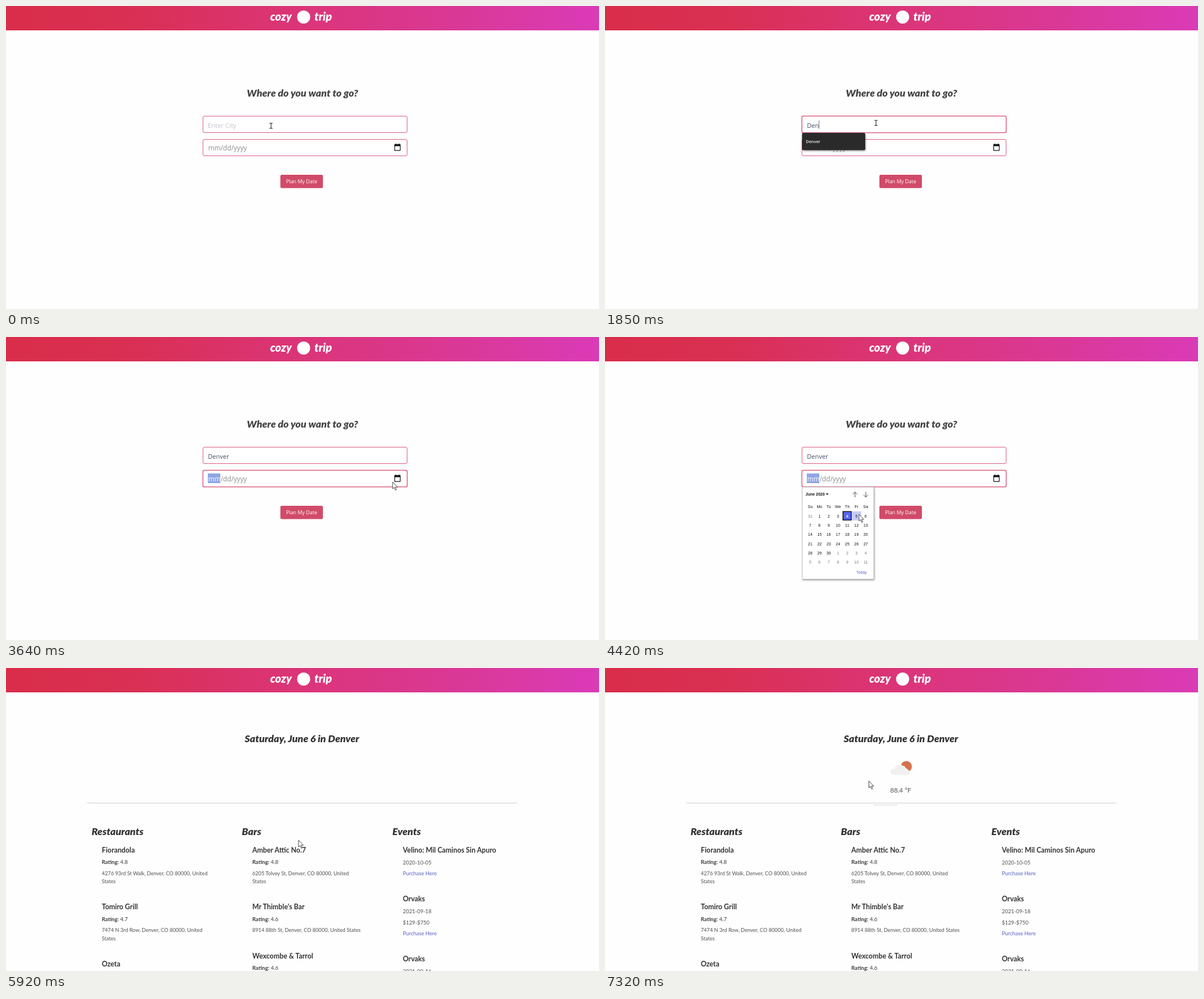
These frames come from a looping animation (1046x535 px, 8000 ms). An HTML page:

```html
<!DOCTYPE html>
<html lang="en">
<head>
<meta charset="utf-8">
<title>Evening planner</title>
<style>
  html, body { margin: 0; width: 100%; height: 100%; overflow: hidden; background: #fefefe; }
  svg { display: block; width: 1046px; height: 535px; }
  text { white-space: pre; }
  .brand, .head { font: italic 900 17.8px Lato, sans-serif; fill: #333; }
  .brand { font-size: 20px; fill: #fff; }
  .ask { fill: #444; }
  .field { fill: #fff; stroke: #dd5c7d; }
  .ring { fill: none; stroke: #e07590; stroke-width: 1.8; }
  .input { font: 11px "Open Sans", sans-serif; fill: #434c66; }
  .hint { font-size: 11.2px; fill: #c0c3cb; }
  .date { font-size: 11.7px; fill: #8b8b8b; }
  .date .on { fill: #fff; }
  .button { font: 8.95px "Open Sans", sans-serif; fill: #fff; }
  .option { font: 600 7.3px "Open Sans", sans-serif; fill: #f2f2f2; }
  .cal { font: 7px "Liberation Sans", Arial, sans-serif; fill: #111; text-anchor: middle; }
  .month { font-weight: bold; text-anchor: start; }
  .dim { fill: #777; }
  .pick { font-weight: bold; fill: #fff; }
  .today { fill: #5a62cf; }
  .name { font: 700 12.3px Lato, sans-serif; fill: #333; }
  .info { font: 9.15px Lato, sans-serif; fill: #505050; }
  .rate { font-size: 9.6px; fill: #3c3c3c; }
  .event { font-size: 9.4px; }
  .link { fill: #5a60c4; }
  .temp { font: 11.5px Lato, sans-serif; fill: #555; text-anchor: middle; }
  b, .bold { font-weight: 700; }
</style>
</head>
<body>
<svg viewBox="0 0 1046 535">
  <defs>
    <linearGradient id="bar">
      <stop offset="0" stop-color="#d92d4a"/>
      <stop offset=".2" stop-color="#d92f52"/>
      <stop offset=".5" stop-color="#db3579"/>
      <stop offset=".75" stop-color="#da3894"/>
      <stop offset="1" stop-color="#da3bb7"/>
    </linearGradient>
    <filter id="shadow" x="-10%" y="-10%" width="120%" height="125%">
      <feDropShadow dx="1" dy="1.5" stdDeviation="1.5" flood-opacity=".4"/>
    </filter>
  </defs>

  <rect width="1046" height="43" fill="url(#bar)"/>
  <text class="brand" x="466" y="26">cozy</text>
  <circle cx="525" cy="19.5" r="11.5" fill="#fff"/>
  <text class="brand" x="544" y="26">trip</text>

  <g data-show="0-5920">
    <text class="head ask" x="523" y="160" text-anchor="middle">Where do you want to go?</text>

    <rect class="field" x="347.5" y="194.5" width="360" height="29" rx="2.5"/>
    <rect class="field" x="347.5" y="235.5" width="360" height="29" rx="2.5"/>
    <rect class="ring" data-show="1170-1290" opacity=".6" x="347.3" y="194.3" width="360.4" height="29.4" rx="2.5"/>
    <rect class="ring" data-show="1290-3090" x="347.3" y="194.3" width="360.4" height="29.4" rx="2.5"/>
    <rect class="ring" data-show="3090-3210" opacity=".6" x="347.3" y="235.3" width="360.4" height="29.4" rx="2.5"/>
    <rect class="ring" data-show="3210-5920" x="347.3" y="235.3" width="360.4" height="29.4" rx="2.5"/>

    <text class="input hint" data-show="0-1440" x="356" y="214.5">Enter City</text>
    <text class="input" id="city" x="356.3" y="214.5"></text>
    <rect id="caret" data-show="1170-2670" y="202" width=".8" height="15" fill="#555"/>

    <rect data-show="3090-4990" x="356" y="241" width="22" height="17" fill="#8fa6e4"/>
    <rect data-show="4990-5920" x="356" y="241" width="14" height="17" fill="#8fa6e4"/>
    <text class="input date" data-show="0-3090" x="356.8" y="255">mm/dd/yyyy</text>
    <text class="input date" data-show="3090-4990" x="356.8" y="255"><tspan class="on">mm</tspan>/dd/yyyy</text>
    <text class="input date" data-show="4990-5920" x="356.8" y="255"><tspan class="on">06</tspan>/06/2020</text>
    <path fill="#111" fill-rule="evenodd" d="M686 244h1v-1.3h1.4v1.3h4.2v-1.3h1.4v1.3h1q1 0 1 1v9.8q0 1-1 1h-9q-1 0-1-1V245q0-1 1-1zM686.2 247.4v7.2h8.6v-7.2z"/>

    <rect data-show="0-5120" x="484" y="298" width="75" height="23.5" rx="2.5" fill="#d14b69"/>
    <rect data-show="5120-5920" x="484" y="298" width="75" height="23.5" rx="2.5" fill="#cb3b5b"/>
    <text class="button" x="494" y="313.3">Plan My Date</text>

    <g data-show="1170-1440">
      <rect x="347.5" y="224" width="111.5" height="51.5" rx="2.5" fill="#292a2c" filter="url(#shadow)"/>
      <text class="option" x="354.3" y="242.3">Washington Dc</text>
      <text class="option" x="354.3" y="263.2">Denver</text>
    </g>
    <g data-show="1440-2260">
      <rect x="347.5" y="224" width="111.5" height="30.5" rx="2.5" fill="#292a2c" filter="url(#shadow)"/>
      <text class="option" x="354.3" y="242.3">Denver</text>
    </g>

    <g id="picker" data-show="3920-4990">
      <rect x="348" y="265" width="126" height="162.5" fill="#fff" stroke="#b5b5b5" stroke-width=".8" filter="url(#shadow)"/>
      <text class="cal month" x="353.8" y="280.2">June 2020</text>
      <path d="M389.7 276.3h4.6l-2.3 2.6z"/>
      <path d="M441 283v-9.2m-4 4 4-4 4 4M460 273.5v9.2m-4-4 4 4 4-4" fill="none" stroke="#333" stroke-width=".9"/>
      <rect data-show="4420-4540" x="436" y="307.8" width="15.7" height="16" fill="#c9ccf8"/>
      <rect data-show="4540-4840" x="452.2" y="307.8" width="15.7" height="16" fill="#c9ccf8"/>
      <rect id="picked" x="419.7" y="308.2" width="14.8" height="15" fill="#5664f0" stroke="#111" stroke-width="1.4"/>
      <g id="days"></g>
      <text class="cal today" x="452.5" y="418">Today</text>
    </g>
  </g>

  <g data-show="5920-8000">
    <text class="head" x="522" y="131" text-anchor="middle">Saturday, June 6 in Denver</text>
    <path d="M141 237.2H904.5Q901 239.8 893 239.8H152Q144 239.8 141 237.2z" fill="#e7e7e7"/>
    <rect data-show="7050-8000" x="473.5" y="239.8" width="43" height="4" rx="2" fill="#f1f1f1"/>

    <g data-show="6050-6200">
      <circle cx="529" cy="170.2" r="8.3" fill="#d4714d"/>
      <path d="M511 180a9 9 0 0 1 11-15.5l1.5 4.5q4-1 5 2.8 3.6-.5 4.5 3.2h4v7z" fill="#fefefe"/>
      <path d="m516 181-1 2.5m5.2-2-1 2.5m5-2-1 2.5m-7 1.5-1 2.5m4.8-2-1 2.5m5.2-3-1 2.5" fill="none" stroke="#333" stroke-width="1.5"/>
      <text class="temp" x="522" y="220">79.8 °F</text>
    </g>
    <g data-show="6200-8000">
      <circle cx="531.5" cy="174" r="9.8" fill="#d4714d"/>
      <path d="M509 189.2a6 6 0 0 1-.5-12q1.2 0 2.2.4a7.6 7.6 0 0 1 13.8-4.3q4.6-.3 5.6 4.2 3.4.4 4 3.6 4.4.6 4.2 4.3-.3 3.8-4.4 3.8z" fill="#f0f0f0" stroke="#fefefe" stroke-width="1.2"/>
      <text class="temp" x="521.5" y="220">88.4 °F</text>
    </g>
    <g id="lists"></g>
  </g>

  <g id="mouse" stroke-linejoin="round">
    <path id="beam" d="M-2.6-4.6h1.6l1 .7 1-.7h1.6M-2.6 4.6h1.6l1-.7 1 .7h1.6M0-4v8" fill="none" stroke="#222" stroke-width="1.1"/>
    <path id="arrow" d="M0 0v12l2.8-2.4 2 4.7 1.8-.8L4.7 9h3.8z" fill="#fff" stroke="#333" stroke-width=".9"/>
    <path id="hand" d="M4 1.5Q4 0 5 0t1 1.5V5.5l4.5 1.2Q12 7.2 12 9l-1 4v3H4.5L4 14 .5 9.8Q.3 8 2 8.4l2 1.4z" fill="#fff" stroke="#222" stroke-width=".9"/>
  </g>
</svg>

<script>
const LOOP = 8000;
const $ = id => document.getElementById(id);
const text = (x, y, cls, str) => `<text class="${cls}" x="${x}" y="${y}">${str}</text>`;

// Month grid
const dayX = col => 362 + col * 16.3;
let grid = ['Su', 'Mo', 'Tu', 'We', 'Th', 'Fr', 'Sa'].map((d, i) => text(dayX(i), 301.6, 'cal', d)).join('');
for (let i = 0; i < 42; i++) {
  const date = new Date(2020, 4, 31 + i);
  const y = 318.6 + Math.floor(i / 7) * 16.3;
  grid += text(dayX(i % 7), y, date.getMonth() === 5 ? 'cal' : 'cal dim', date.getDate());
}
$('days').innerHTML = grid;
const dayLabels = [...$('days').children].slice(7);

// Result columns
const venue = (x, y, name, rating, ...address) =>
  text(x, y, 'name', name) +
  text(x, y + 20.5, 'info rate', `<tspan class="bold">Rating:</tspan> ${rating}`) +
  address.map((line, i) => text(x, y + 40 + i * 14.6, 'info', line)).join('');

const show = (y, name, ...lines) =>
  text(700, y, 'name', name) +
  lines.map((line, i) =>
    text(700, y + 21 + i * 19.4, line === 'Purchase Here' ? 'info event link' : 'info event', line)).join('');

$('lists').innerHTML =
  text(151, 295, 'head', 'Restaurants') +
  venue(169, 325.6, 'Fiorandola', '4.8', '4276 93rd St Walk, Denver, CO 80000, United', 'States') +
  venue(169, 426.3, 'Tomiro Grill', '4.7', '7474 N 3rd Row, Denver, CO 80000, United', 'States') +
  venue(169, 527, 'Ozeta', '4.6') +
  text(416, 295, 'head', 'Bars') +
  venue(434.5, 325.6, 'Amber Attic No.7', '4.8', '6205 Tolvey St, Denver, CO 80000, United', 'States') +
  venue(434.5, 426.3, "Mr Thimble's Bar", '4.6', '8914 88th St, Denver, CO 80000, United States') +
  venue(434.5, 512.5, 'Wexcombe &amp; Tarrol', '4.6') +
  text(681.5, 295, 'head', 'Events') +
  show(325.6, 'Velino: Mil Caminos Sin Apuro', '2020-10-05', 'Purchase Here') +
  show(412.3, 'Orvaks', '2021-09-18', '$129-$750', 'Purchase Here') +
  show(518, 'Orvaks', '2021-09-16');

// Pointer stops: time, shape, x, y
const stops = [
  [0, 'beam', 467.5, 211.5], [1290, 'beam', 478, 206.5],
  [3090, 'beam', 530, 202], [3210, 'beam', 573, 197], [3360, 'beam', 640, 212],
  [3490, 'arrow', 693, 230], [3640, 'arrow', 682, 256], [3770, 'arrow', 689, 251],
  [4180, 'arrow', 560, 280], [4300, 'arrow', 432, 307], [4420, 'arrow', 448, 313],
  [4540, 'arrow', 455, 308], [4690, 'arrow', 454, 308],
  [5120, 'hand', 490, 305], [5250, 'hand', 512, 304], [5920, 'arrow', 516, 304],
  [6610, 'arrow', 497.5, 296], [6750, 'arrow', 499, 294], [6900, 'arrow', 507, 283],
  [7050, 'arrow', 490, 240], [7180, 'arrow', 470, 194], [7320, 'arrow', 465.5, 199.5]
];
const keyTimes = [1440, 1570, 1850, 1990, 2110, 2260];

const timed = [...document.querySelectorAll('[data-show]')].map(el => {
  const [from, to] = el.dataset.show.split('-').map(Number);
  return { el, from, to };
});

function draw(t) {
  for (const { el, from, to } of timed) el.style.display = t >= from && t < to ? '' : 'none';

  const typed = 'Denver'.slice(0, keyTimes.filter(k => t >= k).length);
  if ($('city').textContent !== typed) $('city').textContent = typed;
  if (t < 2670) $('caret').setAttribute('x', 356.3 + (typed ? $('city').getComputedTextLength() : 0));

  const col = t < 4840 ? 4 : 6;
  $('picked').setAttribute('x', dayX(col) - 7.5);
  $('picker').style.opacity = t < 4040 ? .5 : 1;
  for (const i of [4, 6]) dayLabels[i].classList.toggle('pick', i === col);

  const [, shape, x, y] = stops.findLast(s => t >= s[0]);
  $('mouse').setAttribute('transform', `translate(${x} ${y})`);
  for (const id of ['beam', 'arrow', 'hand']) $(id).style.display = id === shape ? '' : 'none';
}

const start = performance.now();
function tick() {
  draw((performance.now() - start) % LOOP);
  requestAnimationFrame(tick);
}
tick();
</script>
</body>
</html>
```
